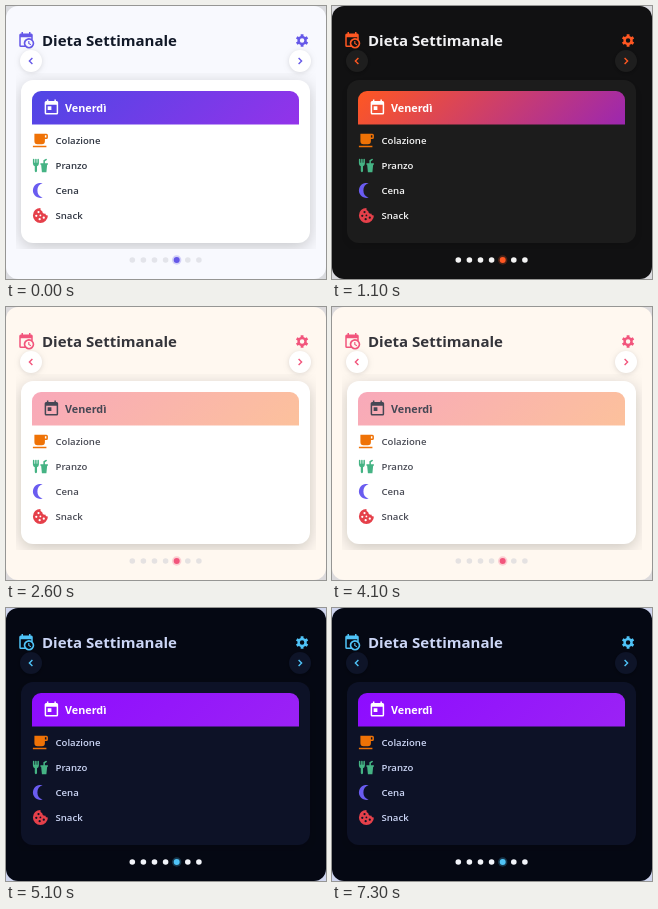
Animation of 320x273 px, one loop 7500 ms. Source, as an HTML page with a canvas:

```html
<!DOCTYPE html>
<html lang="it">
<head>
<meta charset="utf-8">
<title>Dieta Settimanale</title>
<style>
html, body { margin: 0; width: 100%; height: 100%; overflow: hidden; }
canvas { display: block; width: 320px; height: 273px; }
</style>
</head>
<body>
<canvas id="stage" width="320" height="273"></canvas>
<script>
const ctx = document.getElementById('stage').getContext('2d');
const LOOP = 7500;
const FONT = '"Open Sans", "Noto Sans", sans-serif';

const themes = {
  light: { bg: '#f8f9fe', corner: '#d9dade', card: '#ffffff', button: '#ffffff', title: '#111827', text: '#303642',
    accent: '#6558e8', head: ['#4f46e5', '#9333ea'], headText: '#ffffff', dot: '#e3e4ea', shadow: true },
  ember: { bg: '#111112', corner: '#dcdce0', card: '#1c1c1c', button: '#1e1e1e', title: '#f1f1f3', text: '#f5f5f5',
    accent: '#ff5722', head: ['#ff5722', '#9c27b0'], headText: '#ffffff', dot: '#f4f4f4' },
  peach: { bg: '#fff8f0', corner: '#dcdadc', card: '#ffffff', button: '#ffffff', title: '#34343a', text: '#4a4c56',
    accent: '#f2557c', head: ['#f8a9ba', '#fcc19c'], headText: '#454754', dot: '#e5e2e2', shadow: true },
  night: { bg: '#050813', corner: '#cfd5ee', card: '#0d1227', button: '#0e1428', title: '#ccd6f6', text: '#ccd6f6',
    accent: '#4fc3f7', head: ['#8d0cff', '#9b22f5'], headText: '#ffffff', dot: '#f2f4fa' }
};
const schedule = [[4200, 'night'], [2600, 'peach'], [1000, 'ember'], [0, 'light']];

// Icons are drawn on a 24-unit grid.
const icons = {
  calendar: new Path2D('M19 3h-1V1h-2v2H8V1H6v2H5a2 2 0 0 0-2 2V19a2 2 0 0 0 2 2h14a2 2 0 0 0 2-2V5a2 2 0 0 0-2-2zM19 19H5V8h14zM7 10h5v5H7z'),
  schedule: new Path2D('M15 13h1.5v2.8l2.4 1.4-.7 1.3-3.2-1.8zM19 8H5v11h4.7A7 7 0 0 1 19 9.7zM5 21a2 2 0 0 1-2-2V5a2 2 0 0 1 2-2h1V1h2v2h8V1h2v2h1a2 2 0 0 1 2 2v6.1A7 7 0 1 1 11.1 21zM16 11.15a4.85 4.85 0 1 0 .01 0z'),
  cup: new Path2D('M2 21h18v-2H2zM20 8h-2V5h2zM20 3H4v10a4 4 0 0 0 4 4h6a4 4 0 0 0 4-4v-3h2a2 2 0 0 0 2-2V5a2 2 0 0 0-2-2z'),
  lunch: new Path2D('M2 4a1 1 0 0 1 2 0v4a.5.5 0 0 0 1 0V4a1 1 0 0 1 2 0v4a.5.5 0 0 0 1 0V4a1 1 0 0 1 2 0v5.5a4 4 0 0 1-2.5 3.7v6.3a1.5 1.5 0 0 1-3 0v-6.3A4 4 0 0 1 2 9.5zM19.5 3.2L16 5.2V9h-4v2h1l1 10h6l1-10h1V9h-4V6.3l2.5-1.5a1 1 0 0 0-1-1.6z'),
  moon: new Path2D('M2 12a10 10 0 0 0 13 9.54a10 10 0 0 1 0-19.08A10 10 0 0 0 2 12z'),
  cookie: cookiePath(),
  gear: gearPath(),
  pointer: new Path2D('M0 0V12L2.8 9.4 4.7 13.8 6.8 12.9 4.9 8.6H8.7z')
};

const meals = [
  ['Colazione', 'cup', '#ef7206'],
  ['Pranzo', 'lunch', '#45b384'],
  ['Cena', 'moon', '#6a5cf0'],
  ['Snack', 'cookie', '#e5404a']
];

function addCircle(path, x, y, r) {
  path.moveTo(x + r, y);
  path.arc(x, y, r, 0, Math.PI * 2);
}

function cookiePath() {
  const path = new Path2D('M12 2A10 10 0 1 0 22 12a3 3 0 0 1-3.5-2.5a3 3 0 0 1-4-3A4 4 0 0 1 12 2z');
  for (const [x, y, r] of [[9.5, 7.5, 1.5], [6.5, 12.5, 1.5], [12, 12, 1.2], [11, 17, 1.5], [16.5, 15, 1.5]]) {
    addCircle(path, x, y, r);
  }
  return path;
}

function gearPath() {
  const path = new Path2D();
  for (let i = 0; i < 6; i++) {
    for (const [offset, r] of [[-.31, 7.4], [-.22, 10], [.22, 10], [.31, 7.4]]) {
      const a = i * Math.PI / 3 + Math.PI / 6 + offset;
      path.lineTo(12 + r * Math.cos(a), 12 + r * Math.sin(a));
    }
  }
  path.closePath();
  addCircle(path, 12, 12, 3.5);
  return path;
}

function icon(name, x, y, color, scale = .75) {
  ctx.save();
  ctx.translate(x, y);
  ctx.scale(scale, scale);
  ctx.fillStyle = color;
  ctx.fill(icons[name], 'evenodd');
  ctx.restore();
}

function box(x, y, w, h, radius, fill) {
  ctx.beginPath();
  ctx.roundRect(x, y, w, h, radius);
  ctx.fillStyle = fill;
  ctx.fill();
}

function disc(x, y, r, fill) {
  ctx.beginPath();
  ctx.arc(x, y, r, 0, Math.PI * 2);
  ctx.fillStyle = fill;
  ctx.fill();
}

function label(text, x, y, size, weight, color) {
  ctx.font = `${weight} ${size}px ${FONT}`;
  ctx.fillStyle = color;
  ctx.fillText(text, x, y);
}

function castShadow(alpha, blur, y) {
  ctx.shadowColor = `rgba(0,0,0,${alpha})`;
  ctx.shadowBlur = blur;
  ctx.shadowOffsetY = y;
}

function drawCard(theme) {
  ctx.save();
  ctx.beginPath();
  ctx.rect(10, 67, 300, 176);
  ctx.clip();
  castShadow(theme.shadow ? .2 : .15, 16, 4);
  box(15, 74, 289, 163, 12, theme.card);
  ctx.restore();

  // CSS-style 135 degree gradient across the header.
  const reach = (267 + 33) / 4;
  const gradient = ctx.createLinearGradient(159.5 - reach, 101.5 - reach, 159.5 + reach, 101.5 + reach);
  theme.head.forEach((color, i) => gradient.addColorStop(i, color));
  box(26, 85, 267, 33.5, [9, 9, 0, 0], gradient);
  icon('calendar', 36.4, 92.8, theme.headText);
  label('Venerdì', 59, 105.6, 10.8, 700, theme.headText);

  meals.forEach(([name, symbol, color], i) => {
    const y = 134.4 + 25 * i;
    icon(symbol, 25.4, y - 9, color);
    label(name, 49.5, y + 3.4, 9.6, 600, theme.text);
  });
}

function drawArrow(x, direction, theme) {
  ctx.save();
  castShadow(theme.shadow ? .13 : .3, 5, 1);
  disc(x, 55, 11, theme.button);
  ctx.restore();
  ctx.beginPath();
  ctx.moveTo(x - direction * 1.4, 52);
  ctx.lineTo(x + direction * 1.6, 55);
  ctx.lineTo(x - direction * 1.4, 58);
  ctx.strokeStyle = theme.accent;
  ctx.lineWidth = 1.4;
  ctx.stroke();
}

function drawDots(theme) {
  for (let i = 0; i < 7; i++) {
    const x = 126.3 + 11.1 * i;
    if (i === 4) {
      ctx.globalAlpha = .25;
      disc(x, 254, 4.7, theme.accent);
      ctx.globalAlpha = 1;
    }
    disc(x, 254, i === 4 ? 3 : 2.8, i === 4 ? theme.accent : theme.dot);
  }
}

function drawPointer(t) {
  if (t < 5800 || t >= 6100) return;
  const step = (t - 5900) / 100;
  ctx.save();
  ctx.translate(43 - 2 * step, 57 - step);
  ctx.lineWidth = 1;
  ctx.strokeStyle = '#111111';
  ctx.fillStyle = '#ffffff';
  ctx.stroke(icons.pointer);
  ctx.fill(icons.pointer);
  ctx.restore();
}

function draw(t) {
  const theme = themes[schedule.find(([start]) => t >= start)[1]];
  ctx.fillStyle = theme.corner;
  ctx.fillRect(0, 0, 320, 273);
  box(0, 0, 320, 273, 12, theme.bg);
  icon('schedule', 11, 25.3, theme.accent);
  label('Dieta Settimanale', 36, 40, 15, 700, theme.title);
  icon('gear', 288.4, 26.8, theme.accent, .64);
  drawCard(theme);
  drawArrow(25, -1, theme);
  drawArrow(294, 1, theme);
  drawDots(theme);
  drawPointer(t);
}

function tick() {
  draw(performance.now() % LOOP);
  requestAnimationFrame(tick);
}
tick();
</script>
</body>
</html>
```
